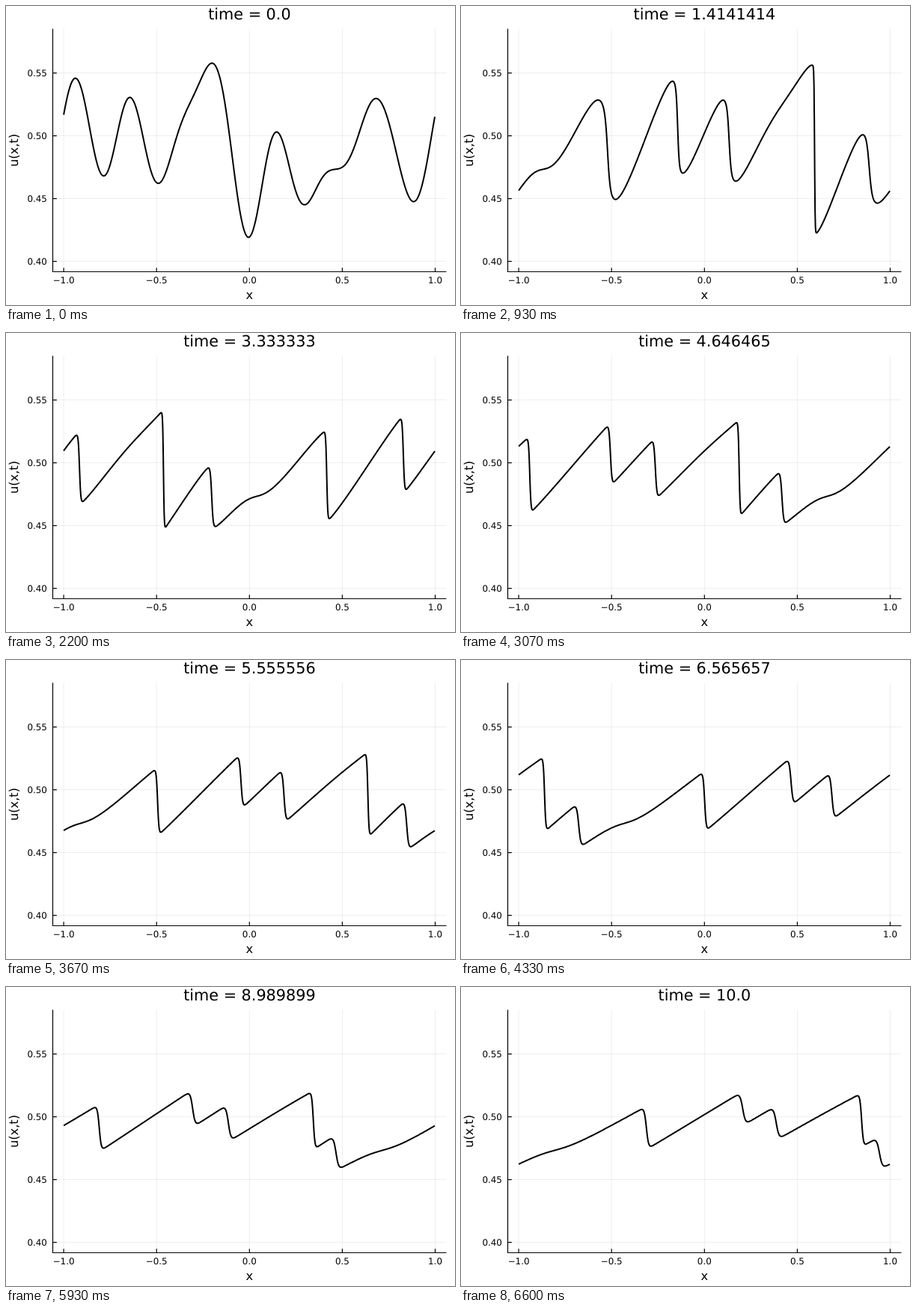
Write an HTML page that moves like this. It is 600 px wide and 400 px high and loops after 6670 ms.

```html
<!DOCTYPE html>
<html lang="en">
<head>
<meta charset="utf-8">
<title>Travelling wave</title>
<style>
  html, body { margin: 0; width: 100%; height: 100%; overflow: hidden; background: #fff; }
  svg {
    display: block; width: 600px; height: 400px;
    font-family: "DejaVu Sans", Verdana, sans-serif; text-rendering: geometricPrecision;
  }
  text { fill: #000; text-anchor: middle; }
  #ticks text { font-size: 11.9px; }
  #ticks .left { text-anchor: end; }
  .label { font-size: 16.3px; }
  #title { font-size: 20.75px; }
  path { fill: none; stroke: #000; }
  #grid { stroke-opacity: .07; }
  #axes { stroke-width: 1.2; }
  #wave { stroke-width: 2; stroke-linejoin: round; }
</style>
</head>
<body>
<svg viewBox="0 0 600 400">
  <path id="grid"/>
  <path id="axes"/>
  <g id="ticks"></g>
  <text class="label" x="325.4" y="392">x</text>
  <text class="label" transform="translate(16.3 193) rotate(-90)">u(x,t)</text>
  <text id="title" x="325.4" y="18.3"></text>
  <path id="wave"/>
</svg>
<script>
const $ = id => document.getElementById(id);
const LOOP = 6670, STEPS = 99, T_END = 10;
const px = x => 325.3 + x * 248.2;
const py = u => 173.6 - (u - 0.5) * 1680;

function drawAxes() {
  let grid = '', axes = 'M62.5 30.5V355.5H588.5', labels = '';
  for (let i = 0; i < 5; i++) {
    const x = -1 + i / 2, p = px(x);
    grid += `M${p} 30.5V355`;
    axes += `M${p} 355.5v-5.3`;
    labels += `<text x="${p}" y="371.4">${x.toFixed(1).replace('-', '\u2212')}</text>`;
  }
  for (let i = 0; i < 4; i++) {
    const u = 0.4 + i / 20, p = py(u);
    grid += `M63 ${p}H588.5`;
    axes += `M62.5 ${p}h5.3`;
    labels += `<text class="left" x="54.9" y="${p + 4.4}">${u.toFixed(2)}</text>`;
  }
  $('grid').setAttribute('d', grid);
  $('axes').setAttribute('d', axes);
  $('ticks').innerHTML = labels;
}

// Starting wave: evenly spaced heights over one period, in thousandths around 0.5
const heights = [
  16.7, 42.4, -14.1, -23, 26.6, 6.3, -37.3, -13.3, 21.9, 48.6, 50.1, -27.3,
  -80.6, -26.4, -0.1, -44.3, -49.6, -29.2, -25, -1, 28.7, 10.7, -38.5, -45.6
];

// Band-limited (trigonometric) interpolation of the heights
function startAt(x) {
  const n = heights.length;
  const sum = heights.reduce((total, h, k) => {
    const a = Math.PI * (x + 1) / 2 - Math.PI * k / n;
    const weight = Math.abs(Math.sin(a)) < 1e-9 ? 1 : Math.sin(n * a) / (n * Math.tan(a));
    return total + h * weight;
  }, 0);
  return 0.5 + sum / 1000;
}

const N = 1024, H = 2 / N, NU = 1e-4, BACK = 4 * N;
const start = Array.from({ length: N }, (_, i) => startAt(-1 + i * H));

// Running integral of the start, continued over neighbouring periods
const area = new Float64Array(6 * N);
for (let j = 1; j < area.length; j++) {
  area[j] = area[j - 1] + H * (start[(j - 1) % N] + start[j % N]) / 2;
}

// Exact viscous Burgers solution by the Cole-Hopf integral
function solve(t) {
  if (t === 0) return start;
  const first = Math.floor((0.4 * t - 0.15) / H);
  const count = Math.ceil((0.58 * t + 0.15) / H) - first;
  const cost = Float64Array.from({ length: count }, (_, k) => ((first + k) * H) ** 2 / (2 * t));
  const g = new Float64Array(count);
  return start.map((_, i) => {
    let low = Infinity, sum = 0, moment = 0;
    for (let k = 0; k < count; k++) {
      g[k] = area[BACK + i - first - k] + cost[k];
      if (g[k] < low) low = g[k];
    }
    for (let k = 0; k < count; k++) {
      const e = (low - g[k]) / (2 * NU);
      if (e < -30) continue;
      const w = Math.exp(e);
      sum += w;
      moment += w * (first + k) * H;
    }
    return moment / sum / t;
  });
}

function timeText(t) {
  const s = t.toFixed(t < 2 ? 7 : 6).replace(/0+$/, '');
  return 'time = ' + (s.endsWith('.') ? s + '0' : s);
}

const paths = [];
function wavePath(step, t) {
  return paths[step] ??= 'M' + solve(t).map((u, i) =>
    px(-1 + i * H).toFixed(2) + ' ' + py(u).toFixed(2)).join('L');
}

let shown = -1;
function draw(now) {
  // Steps last 1/15 s, rounded to whole hundredths
  const step = Math.floor((Math.floor((now % LOOP) / 10) + 0.5) * 0.15);
  if (step === shown) return;
  const t = step * T_END / STEPS;
  $('title').textContent = timeText(t);
  $('wave').setAttribute('d', wavePath(step, t));
  shown = step;
}

function tick() {
  draw(performance.now());
  requestAnimationFrame(tick);
}

drawAxes();
tick();
</script>
</body>
</html>
```
